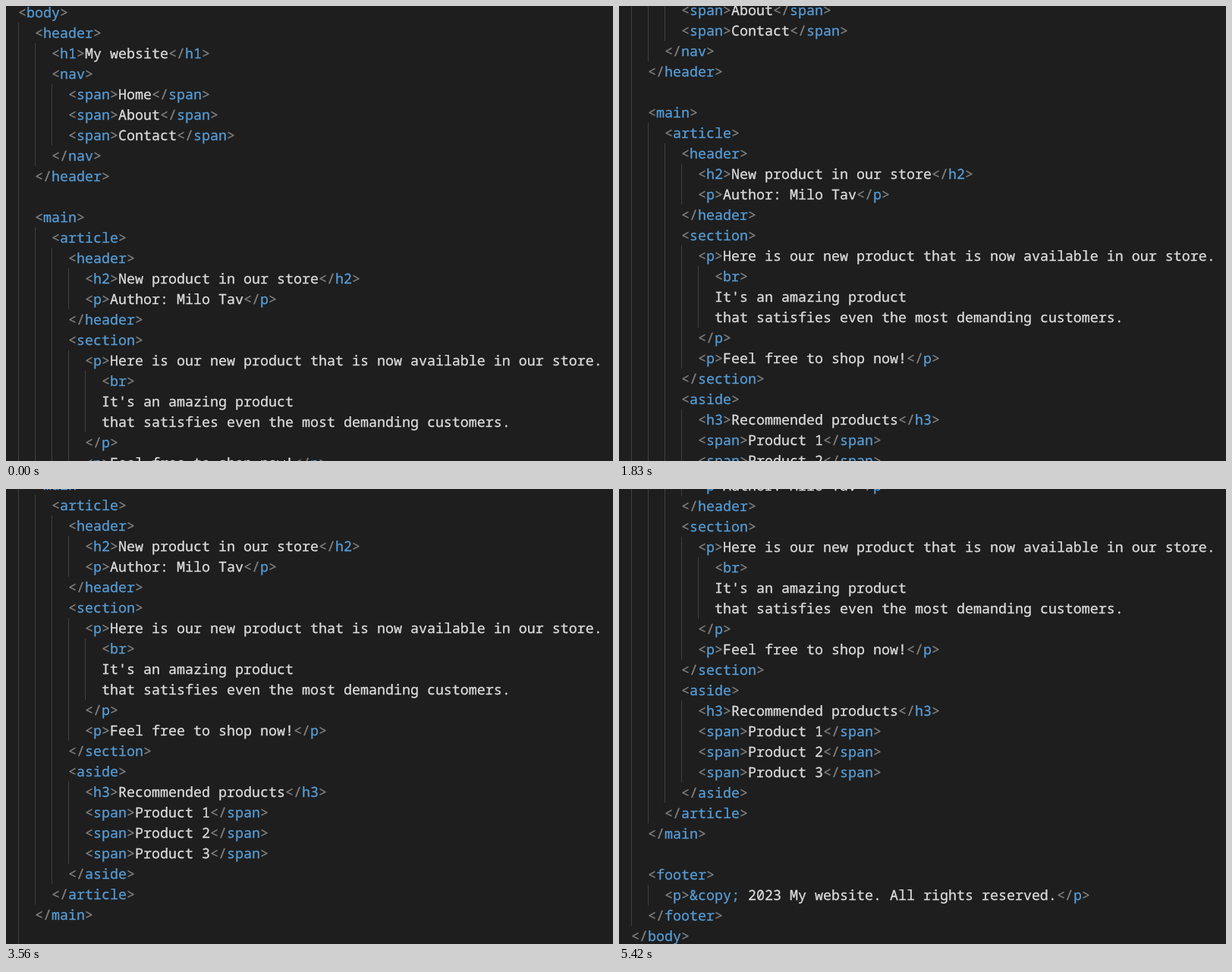
An HTML page that plays this animation: 800x600 px, repeating every 8000 ms.

```html
<!DOCTYPE html>
<html lang="en">
<head>
<meta charset="utf-8">
<title>Scrolling markup</title>
<style>
  html, body { margin: 0; width: 100%; height: 100%; overflow: hidden; background: #1e1e1e; }
  svg { display: block; width: 800px; height: 600px; }
  text {
    font: 18.333px "Noto Sans Mono", "DejaVu Sans Mono", monospace;
    text-rendering: geometricPrecision;
    white-space: pre;
    color: #dcdcdc;
    fill: currentColor;
    stroke: currentColor;
    stroke-width: 0.3px;
  }
  .mark { color: #808080; }
  .name { color: #569cd6; }
  rect { fill: #404040; }
</style>
</head>
<body>
<svg viewBox="0 0 800 600"><g id="page"></g></svg>
<script>
const SOURCE = `<body>
  <header>
    <h1>My website</h1>
    <nav>
      <span>Home</span>
      <span>About</span>
      <span>Contact</span>
    </nav>
  </header>

  <main>
    <article>
      <header>
        <h2>New product in our store</h2>
        <p>Author: Milo Tav</p>
      </header>
      <section>
        <p>Here is our new product that is now available in our store.
          <br>
          It's an amazing product
          that satisfies even the most demanding customers.
        </p>
        <p>Feel free to shop now!</p>
      </section>
      <aside>
        <h3>Recommended products</h3>
        <span>Product 1</span>
        <span>Product 2</span>
        <span>Product 3</span>
      </aside>
    </article>
  </main>

  <footer>
    <p>&copy; 2023 My website. All rights reserved.</p>
  </footer>
</body>`;

const LINE = 27, LEFT = 16, INDENT = 22, BASELINE = 15;
const LOOP = 8000, TICK = 66;
const NOTCH = 391 / 88; // pixels scrolled per notch of the dragged scrollbar

// Changes of drag speed: [time in ms, notches]
const DRAG = [[0, 0], [710, 11], [1430, 25], [2300, 41], [2950, 56], [5420, 88]];

const page = document.getElementById("page");

function add(parent, tag, attributes, content = "") {
  const node = document.createElementNS("http://www.w3.org/2000/svg", tag);
  for (const key in attributes) node.setAttribute(key, attributes[key]);
  node.textContent = content;
  return parent.appendChild(node);
}

function drawLine(line, row) {
  const code = line.trimStart();
  const depth = code ? (line.length - code.length) / 2 : 1;
  for (let i = 0; i < depth; i++) {
    add(page, "rect", { x: LEFT + INDENT * i, y: LINE * row - 5, width: 1, height: LINE });
  }
  const text = add(page, "text", { x: LEFT + INDENT * depth, y: LINE * row + BASELINE });
  let previous = "";
  for (const token of code.match(/<\/?|>|&copy;|[^<>&]+/g) || []) {
    const isName = previous.startsWith("<") || token === "&copy;";
    const kind = /[<>]/.test(token) ? "mark" : isName ? "name" : "plain";
    add(text, "tspan", { class: kind }, token);
    previous = token;
  }
}

// The drag is sampled once per tick and moves in whole notches.
function scrollAt(time) {
  const next = DRAG.findIndex(([start]) => start > time);
  if (next < 0) return Math.round(DRAG.at(-1)[1] * NOTCH);
  const [t0, n0] = DRAG[next - 1], [t1, n1] = DRAG[next];
  const ticks = Math.round((t1 - t0) / TICK);
  const progress = Math.floor((time - t0) / (t1 - t0) * ticks) / ticks;
  return Math.round(Math.round(n0 + (n1 - n0) * progress) * NOTCH);
}

function render() {
  page.setAttribute("transform", `translate(0 ${-scrollAt(performance.now() % LOOP)})`);
  requestAnimationFrame(render);
}

SOURCE.split("\n").forEach(drawLine);
render();
</script>
</body>
</html>
```
